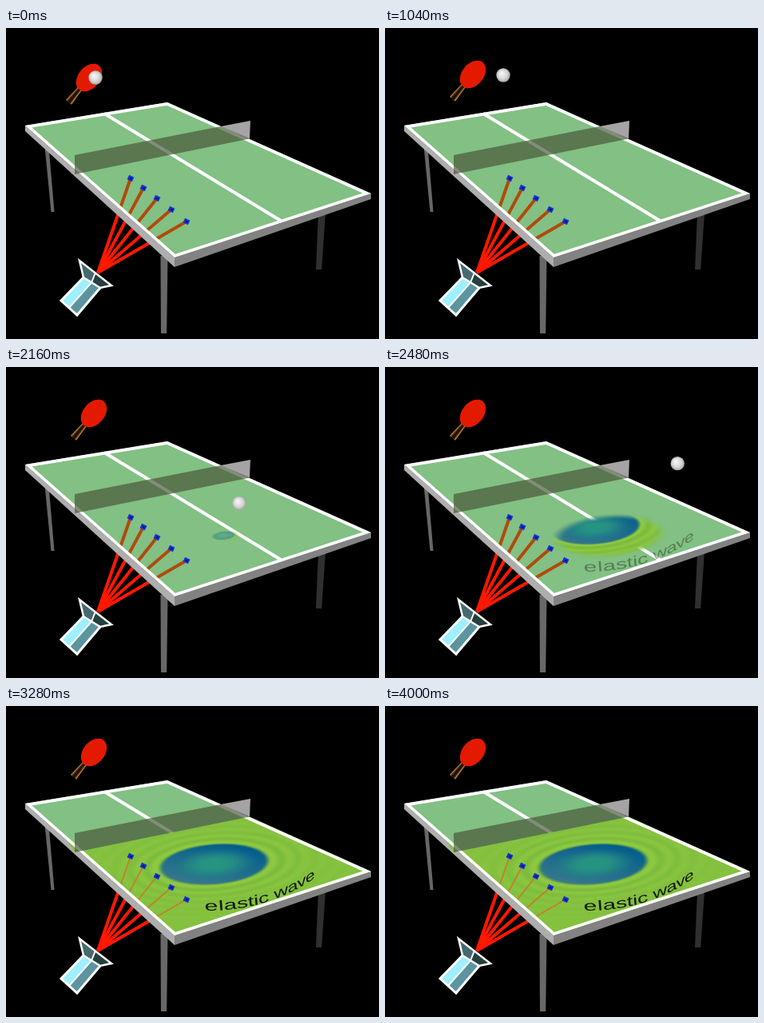
An HTML page with a canvas for the animation above (4080 ms loop, 467x389 px).

```html
<!DOCTYPE html>
<html lang="en">
<head>
<meta charset="utf-8">
<title>Elastic wave on a table</title>
<style>
  html, body { margin: 0; width: 100%; height: 100%; overflow: hidden; background: #000; }
  canvas { display: block; }
</style>
</head>
<body>
<canvas id="stage" width="467" height="389"></canvas>
<script>
const ctx = document.getElementById('stage').getContext('2d');
const LOOP = 4080, STEP = 80, HIT = 1040, BOUNCE = 2040, EXIT = 2800;

const clamp = v => Math.max(0, Math.min(1, v));
const mix = (a, b, p) => a + (b - a) * p;
const mixAll = (a, b, p) => a.map((v, i) => mix(v, b[i], p));
const ramp = (v, from, to) => {
  const p = clamp((v - from) / (to - from));
  return p * p * (3 - 2 * p);
};
// A straight path bent into a parabola; continues past p = 1.
const arc = (from, to, bow, p) => mixAll(from, to, p).map((v, i) => v + bow[i] * p * (1 - p));
const below = ([x, y], depth) => [x, y + depth];

function trace(points, close = true) {
  ctx.beginPath();
  points.forEach(point => ctx.lineTo(...point));
  if (close) ctx.closePath();
}
function fill(points, color) {
  trace(points);
  ctx.fillStyle = color;
  ctx.fill();
}
function stroke(points, color, width, close = false) {
  trace(points, close);
  ctx.strokeStyle = color;
  ctx.lineWidth = width;
  ctx.stroke();
}
function clipped(points, paint) {
  ctx.save();
  trace(points);
  ctx.clip();
  paint();
  ctx.restore();
}

const left = [24, 122], far = [202, 93], right = [457, 207], near = [211, 287];
const tableTop = [left, far, right, near];
const netLeft = [86, 183], netRight = [305, 138.5];
const nearHalf = [netLeft, netRight, right, near, [75, 167]];
const source = [115, 306];
const sensors = [0, 1, 2, 3, 4].map(i => arc([156, 188], [226, 242], [-8, -8], i / 4));

function drawLeg([x, y], length, lean, width, color) {
  const foot = [x + lean, y + length];
  fill([[x, y], [x + width, y], [foot[0] + width * 0.8, foot[1]], foot], color);
}

function drawTable() {
  drawLeg([48.5, 148], 82, 8, 5, '#676767');
  drawLeg([391, 232], 70, -3, 9, '#303030');
  drawLeg([193.5, 285], 97, 0.5, 9, '#686868');
  sensors.forEach(s => stroke([source, s], '#ff1800', 4));
  fill([left, near, below(near, 12), below(left, 7)], '#aeaeae');
  fill([near, right, below(right, 7), below(near, 12)], '#828282');
  fill(tableTop, '#82c083');
  stroke([[123, 107], [344, 241]], '#fff', 4);
}

const drawBeamsOnTable = (color, width) =>
  clipped(tableTop, () => sensors.forEach(s => stroke([source, s], color, width)));

function drawBorder() {
  clipped(tableTop, () => stroke(tableTop, '#fff', 7.5, true));
}

function drawSensors() {
  for (const [x, y] of sensors) {
    ctx.save();
    ctx.translate(x, y);
    ctx.rotate(0.45);
    ctx.fillStyle = '#1530d8';
    ctx.fillRect(-3.5, -3, 7, 6);
    ctx.fillStyle = '#0c1460';
    ctx.fillRect(-1, -1, 3, 2);
    ctx.restore();
  }
}

function drawNet() {
  const topLeft = [86, 159], topRight = [306, 116], farEdge = [269, 123];
  fill([topLeft, farEdge, netRight, netLeft], 'rgba(70,84,56,.67)');
  fill([farEdge, topRight, netRight], '#a5a3a3');
}

function drawLaser() {
  const rimA = [92, 291], rim = [112, 306], rimB = [132, 322];
  const neckA = [97, 312], neck = [107, 318.5], neckB = [118, 325];
  const endA = [69, 341], end = [79, 350], endB = [89, 359];
  fill([neckA, neck, end, endA], '#9eefff');
  fill([neck, neckB, endB, end], '#5c949f');
  fill([rimA, rim, neck, neckA], '#456a70');
  fill([rim, rimB, neckB, neck], '#263f3f');
  stroke([neckA, endA, endB, neckB], '#fff', 3);
  stroke([rimA, rimB, neckB, neckA], '#fff', 2.5, true);
  stroke([rim, neck, end], '#fff', 2);
}

function drawPaddle(t) {
  ctx.save();
  ctx.translate(...mixAll([104, 62], [110, 58], ramp(t, 0, 400)));
  ctx.rotate(-0.88);
  // Nested handle strips: wood, dark grip, highlight.
  ['#b8803c', '#5a3312', '#1e0f06'].forEach((color, i) => {
    const inner = 3 - i, outer = 4.6 - i * 1.4;
    fill([[-16, -inner], [-16, inner], [-40, outer], [-40, -outer]], color);
  });
  ctx.beginPath();
  ctx.ellipse(0, 0, 19.5, 13.5, 0, 0, 7);
  ctx.fillStyle = '#e41a00';
  ctx.fill();
  ctx.restore();
}

function ballAt(t) {
  if (t < HIT) return arc([112, 62], [148, 59], [0, -88], t / HIT);
  if (t < BOUNCE) return arc([148, 59], [270, 203], [30, 26], (t - HIT) / (BOUNCE - HIT));
  return arc([270, 203], [464, 126], [-66, -155], (t - BOUNCE) / (EXIT - BOUNCE));
}

function drawBall(t) {
  const [x, y] = ballAt(t);
  if (x > 478) return;
  const shade = ctx.createRadialGradient(x - 2, y - 2.5, 1, x, y, 9);
  shade.addColorStop(0, '#f4f4f4');
  shade.addColorStop(0.6, '#d6d6d6');
  shade.addColorStop(1, '#a2a2a2');
  ctx.fillStyle = shade;
  ctx.beginPath();
  ctx.arc(x, y, 8.7, 0, 7);
  ctx.fill();
}

const wave = document.createElement('canvas');
wave.width = 390;
wave.height = 152;
const waveCtx = wave.getContext('2d');
const WAVE_X = 74, WAVE_Y = 136;

// Distance in table space, where the dent has radius 1.
const tableDistance = (dx, dy) => Math.hypot((dx - 0.08 * dy) / 69, (dy + 0.08 * dx) / 25.5);

function waveColor(r, phase, slope) {
  const dent = mixAll([38, 148, 130], [28, 106, 140], ramp(r, 0.15, 0.85));
  const rim = ramp(r, 0.91, 1.04);
  const ripple = 13 * Math.cos(2 * Math.PI * ((r - 1.18) / 0.3 - phase)) * Math.exp(1.6 * (1 - r));
  const surface = [132 + ripple, 193 + ripple * 0.6, 62 + ripple * 0.3];
  const light = 24 * slope * ramp(r, 0.3, 0.9) * (1 - rim);
  return mixAll(dent, surface, rim).map((v, i) => v + light * (1 - i * 0.5));
}

function drawWave(t) {
  if (t < BOUNCE + STEP) return;
  const grow = ramp(t, 2020, 2660), size = mix(0.1, 1, grow);
  const [cx, cy] = mixAll([273, 212], [260, 197.5], grow);
  const front = mix(0.2, 1.9, ramp(t, 2060, 2860)) + 5 * ramp(t, 2800, 3240);
  const strength = mix(0.4, 1, ramp(t, 2120, 2480));
  const phase = (t - EXIT) / 700;
  const image = waveCtx.createImageData(wave.width, wave.height);
  for (let i = 0; i < wave.width * wave.height; i++) {
    const x = i % wave.width + WAVE_X, y = Math.floor(i / wave.width) + WAVE_Y;
    const reach = tableDistance(x - mix(273, 281, grow), y - 211);
    const alpha = strength * (1 - ramp(reach, front * 0.7, front));
    if (alpha <= 0) continue;
    const dx = x - cx, dy = y - cy;
    const color = waveColor(tableDistance(dx, dy) / size, phase, dy / 25 - dx / 140);
    image.data.set([...color, 255 * alpha], i * 4);
  }
  waveCtx.putImageData(image, 0, 0);
  clipped(nearHalf, () => ctx.drawImage(wave, WAVE_X, WAVE_Y));
}

// Letters lie on the table along a curve, so they narrow as they recede.
function drawLabel(t) {
  const start = [249, 256], end = [391, 212], bow = [20, 46], length = 154;
  ctx.save();
  ctx.globalAlpha = ramp(t, 2320, 2700);
  ctx.font = '18px "Liberation Sans", Arial, sans-serif';
  ctx.fillStyle = '#10180a';
  let p = 0;
  for (const letter of 'elastic wave') {
    const depth = 1.68 - 0.36 * p;
    const next = p + ctx.measureText(letter).width * depth / length;
    const [x, y] = arc(start, end, bow, p), [nextX, nextY] = arc(start, end, bow, next);
    const angle = Math.atan2(nextY - y, nextX - x);
    ctx.save();
    ctx.translate(x, y);
    ctx.transform(depth * Math.cos(angle), depth * Math.sin(angle), 0.08, 0.97, 0, 0);
    ctx.fillText(letter, 0, 0);
    ctx.restore();
    p = next;
  }
  ctx.restore();
}

function draw(t) {
  ctx.fillStyle = '#000';
  ctx.fillRect(0, 0, 467, 389);
  drawTable();
  drawBeamsOnTable('#b04a0c', 4);
  drawWave(t);
  ctx.globalAlpha = ramp(t, 2500, 2800);
  drawBeamsOnTable(`rgb(${mixAll([176, 74, 12], [189, 132, 44], ramp(t, 2760, 3200))})`, mix(4, 2, ramp(t, 2760, 3200)));
  ctx.globalAlpha = 1;
  drawBorder();
  drawLabel(t);
  drawNet();
  drawSensors();
  drawLaser();
  drawPaddle(t);
  drawBall(t);
}

function tick() {
  const t = performance.now() % LOOP;
  draw(Math.floor(t / STEP) * STEP);
  requestAnimationFrame(tick);
}
tick();
</script>
</body>
</html>
```
